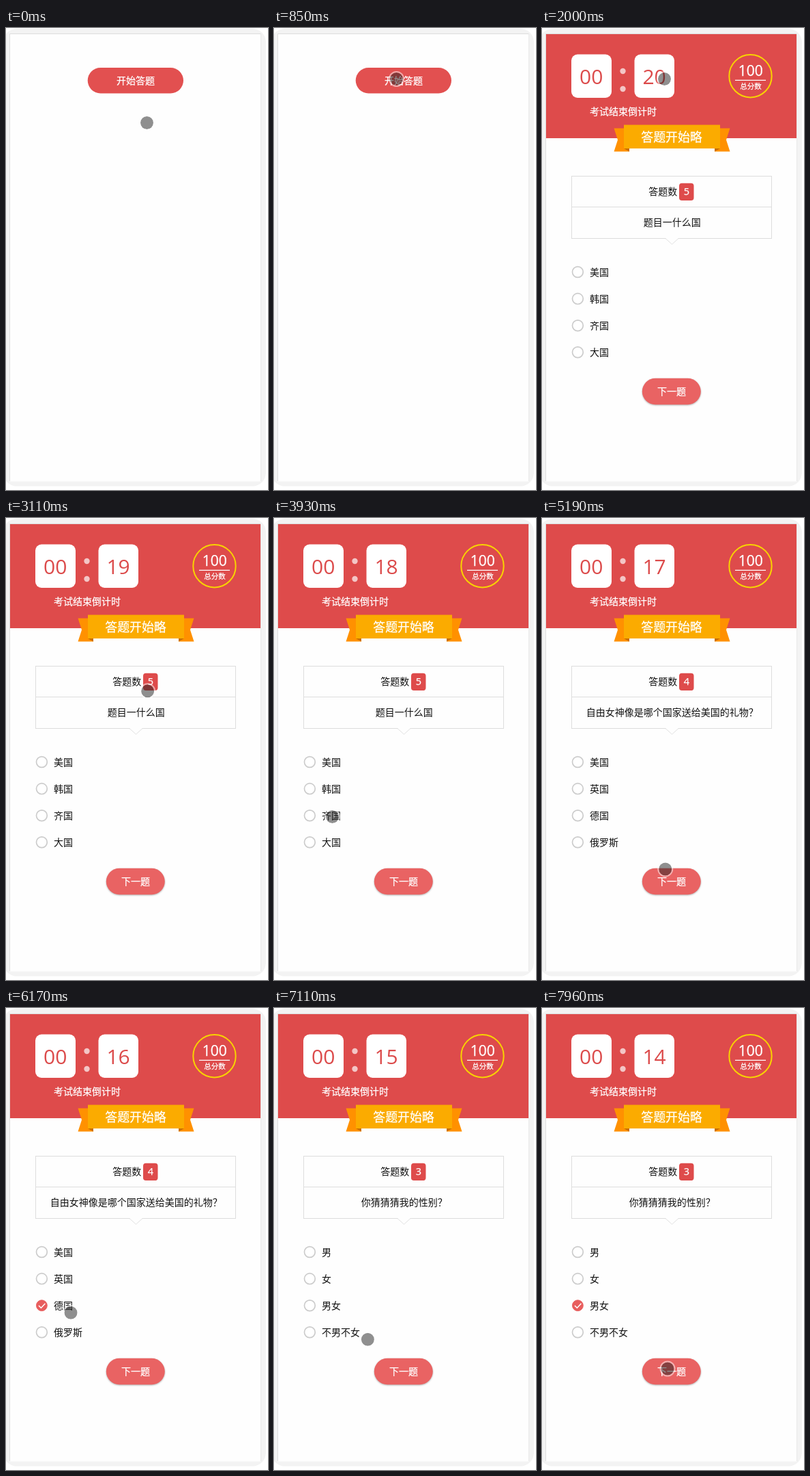
An HTML page for the animation above (8000 ms loop, 384 px wide and 675 px high).

```html
<!DOCTYPE html>
<html lang="zh-CN">
<head>
<meta charset="utf-8">
<title>答题</title>
<style>
  html, body { margin: 0; width: 100%; height: 100%; overflow: hidden; background: #fff; }
  svg { display: block; width: 384px; height: 675px; }
  text { font: 14px "Noto Sans CJK SC", "Noto Sans CJK", sans-serif; fill: #111; }
  .mid { text-anchor: middle; }
  .light { fill: #fff; }
  text.light { stroke: #fff; stroke-width: .25; }
  .num { font-family: "Open Sans", "Noto Sans", sans-serif; text-anchor: middle; }
  .clock { font-size: 30px; fill: #dc4b4b; }
  .red { fill: #de4b4b; }
  .line { fill: none; stroke: #ddd; }
  .ring { fill: #fff; stroke: #ccc; stroke-width: 1.7; }
  .picked .ring { fill: #e85e5e; stroke: #e85e5e; stroke-width: 1; }
  .tick { fill: none; stroke: #fff; stroke-width: 1.5; visibility: hidden; }
  .picked .tick { visibility: inherit; }
  #next { fill: #e96363; filter: drop-shadow(0 1.5px 1px rgba(0, 0, 0, .3)); }
</style>
</head>
<body>
<svg viewBox="0 0 384 675">
  <rect x="-4" y="1" width="385" height="668.5" rx="20" fill="#f3f3f3"/>
  <rect x="5.5" y="8.5" width="368" height="654" fill="#fefefe"/>
  <path class="line" d="M5.5 662V8.5H373.5"/>
  <path d="M373.5 9V662" stroke="#e9e9e9"/>

  <g id="intro">
    <rect x="119.7" y="58" width="140.3" height="37.4" rx="18.7" fill="#e25050"/>
    <text class="mid light" x="190" y="82">开始答题</text>
  </g>

  <g id="quiz">
    <rect class="red" x="6" y="9" width="367" height="152"/>
    <rect class="light" x="43" y="38.5" width="59" height="63.5" rx="9"/>
    <rect class="light" x="135.5" y="38.5" width="58.5" height="63.5" rx="9"/>
    <g fill="#f3c6c6"><circle cx="118.5" cy="63" r="4.2"/><circle cx="118.5" cy="89" r="4.2"/></g>
    <text class="num clock" x="72.2" y="82">00</text>
    <text class="num clock" id="secs" x="164.6" y="82">20</text>
    <text class="light" x="70" y="127">考试结束倒计时</text>

    <circle cx="305.5" cy="70.2" r="31.2" fill="none" stroke="#f8d300" stroke-width="2"/>
    <text class="num light" x="305.8" y="70" style="font-size:21px">100</text>
    <path d="M283 76.3H328" stroke="#fff" stroke-width="1.2"/>
    <text class="mid light" x="306" y="89.2" style="font-size:10.5px">总分数</text>

    <g id="tail">
      <path d="M105.5 146.5H128V180.5H105.5L111 163.5Z" fill="#ff9100"/>
      <path d="M120 176H128V180.5Z" fill="#c96d00"/>
    </g>
    <use href="#tail" transform="translate(381) scale(-1 1)"/>
    <rect x="120" y="141.5" width="141" height="34.5" fill="#fbab00"/>
    <text class="mid light" x="190" y="166" style="font-size:17.9px">答题开始略</text>

    <rect class="line" x="43.5" y="216.5" width="293" height="91"/>
    <path class="line" d="M43.5 261.5H336.5"/>
    <path d="M181 307L190.5 316L200 307Z" fill="#fefefe"/>
    <path d="M181 307.5L190.5 316L200 307.5" fill="none" stroke="#e2e2e2"/>
    <text x="156.3" y="244">答题数</text>
    <rect class="red" x="201" y="226.7" width="21.5" height="25.3" rx="4"/>
    <text class="num light" id="left" x="212" y="244" style="font-size:14.5px"></text>
    <text class="mid" id="ask" x="190.7" y="289"></text>

    <g id="options"></g>

    <rect id="next" x="146.8" y="511.8" width="86" height="38.4" rx="19.2"/>
    <text class="mid light" x="190" y="536">下一题</text>
  </g>

  <g id="cursor">
    <circle r="9.5" fill="#202020" fill-opacity=".5"/>
    <circle r="10.5" fill="none" stroke="#fff" stroke-opacity=".5" stroke-width="2"/>
  </g>
</svg>
<script>
const LOOP = 8000, $ = id => document.getElementById(id);

const quiz = [
  { ask: '题目一什么国', options: ['美国', '韩国', '齐国', '大国'] },
  { ask: '自由女神像是哪个国家送给美国的礼物？', options: ['美国', '英国', '德国', '俄罗斯'] },
  { ask: '你猜猜猜我的性别？', options: ['男', '女', '男女', '不男不女'] }
];

const home = [206.5, 138.5], begin = [179.5, 74.5], option = [85.5, 436.5], next = [184, 527];

// pointer trips: leave, arrive, time the click takes effect, goal, optional bend
const trips = [
  { leave: 100, arrive: 520, click: 2000, to: begin, via: [240, 200] },
  { leave: 2480, arrive: 3760, click: 4080, to: option, via: [270, 320] },
  { leave: 4160, arrive: 4680, click: 4900, to: next },
  { leave: 4900, arrive: 5880, click: 5900, to: option, via: [180, 480] },
  { leave: 6020, arrive: 6540, click: 6830, to: next },
  { leave: 6830, arrive: 7390, click: 7380, to: option },
  { leave: 7500, arrive: 7940, click: LOOP, to: next }
];

$('options').innerHTML = quiz[0].options.map((_, i) =>
  `<g transform="translate(52.4 ${356.5 + 39.1 * i})"><circle class="ring" r="7.9"/>` +
  `<path class="tick" d="M-4.5 0L-1 3.5L5 -3"/><text x="17.6" y="5.2"></text></g>`).join('');
const rows = [...$('options').children];

// the pointer is seen at about seven frames a second
const hold = t => 100 + Math.floor((t - 100) / 140) * 140;
const clamp = v => Math.min(1, Math.max(0, v));
const ease = k => k * k * (3 - 2 * k);

function pointer(t) {
  const i = Math.max(0, trips.filter(m => m.leave <= t).length - 1);
  const { leave, arrive, to, via } = trips[i];
  const from = i ? trips[i - 1].to : home;
  const k = ease(clamp((t - leave) / (arrive - leave)));
  return from.map((a, axis) => {
    const b = to[axis], c = via ? via[axis] : (a + b) / 2;
    return a * (1 - k) ** 2 + 2 * c * k * (1 - k) + b * k * k;
  });
}

function show(id, on) { $(id).style.visibility = on ? 'visible' : 'hidden'; }

function draw(t) {
  // clicks alternate: open a question, pick an answer
  const clicks = trips.filter(m => m.click <= t).length;
  const n = Math.max(0, Math.ceil(clicks / 2) - 1);
  const picked = clicks > 0 && clicks % 2 === 0;

  show('intro', clicks === 0);
  show('quiz', clicks > 0);
  $('left').textContent = 5 - n;
  $('ask').textContent = quiz[n].ask;
  rows.forEach((row, i) => {
    row.lastChild.textContent = quiz[n].options[i];
    row.classList.toggle('picked', picked && i === 2);
  });
  $('secs').textContent = 20 - Math.max(0, Math.floor((t - 1930) / 985));
  $('cursor').setAttribute('transform', `translate(${pointer(hold(t))})`);
}

const start = performance.now();
function frame() {
  draw((performance.now() - start) % LOOP);
  requestAnimationFrame(frame);
}
frame();
</script>
</body>
</html>
```
